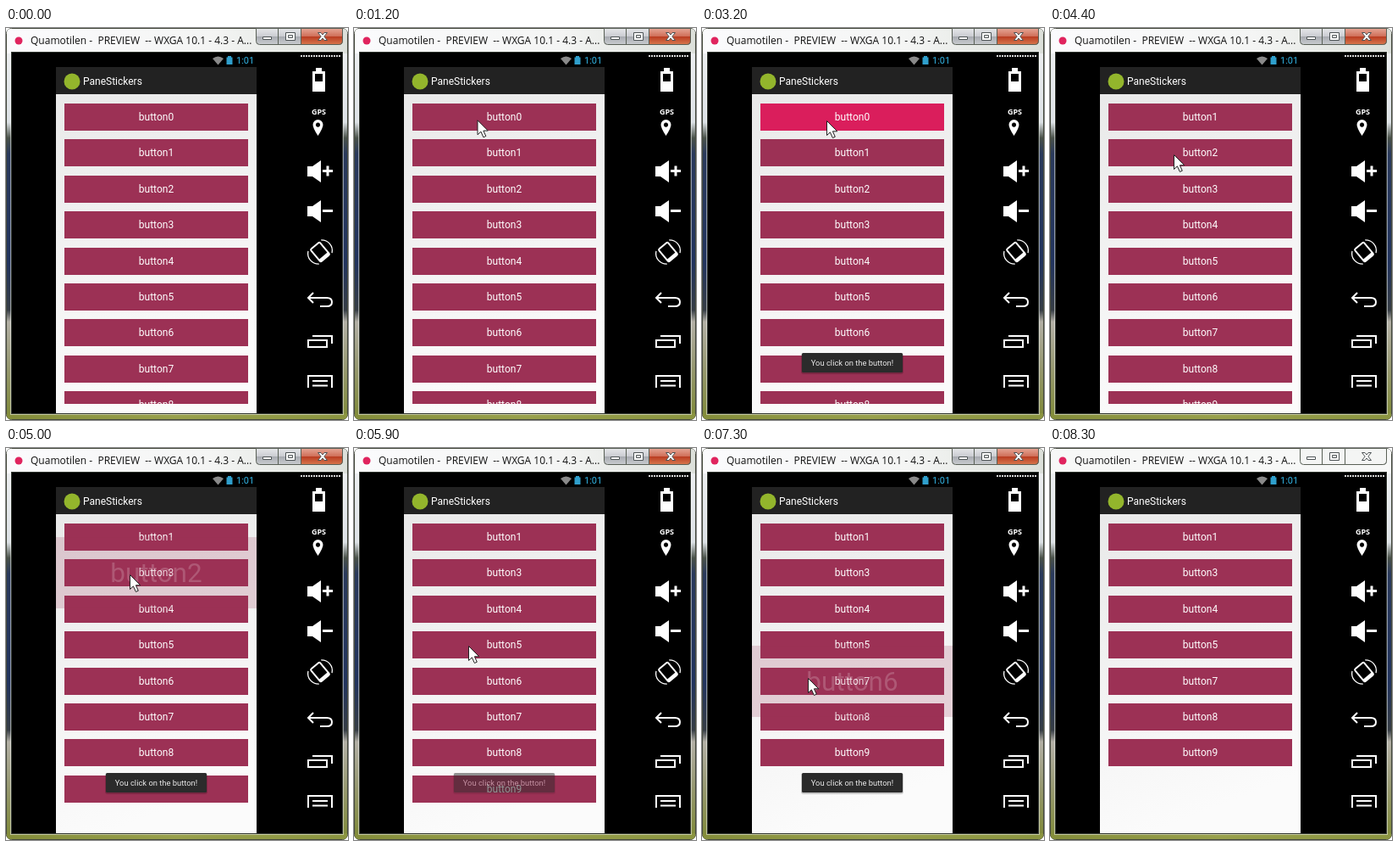
Recreate the animation shown at these times as an HTML page. Size 404 px wide and 462 px high, loop 8400 ms.

```html
<!DOCTYPE html>
<html lang="en">
<head>
<meta charset="utf-8">
<title>Button list</title>
<style>
  html, body { margin: 0; width: 100%; height: 100%; overflow: hidden; background: #fff; }
  svg { display: block; }
  text { font: 12px Roboto, sans-serif; fill: #fff; white-space: pre; }
  .label { text-anchor: middle; }
</style>
</head>
<body>
<svg width="404" height="462" viewBox="0 0 404 462">
  <defs>
    <linearGradient id="glass">
      <stop stop-color="#fbfbfd"/><stop offset=".6" stop-color="#f4f5f4"/>
      <stop offset="1" stop-color="#dce0da"/>
    </linearGradient>
    <linearGradient id="side" x2="0" y2="1">
      <stop stop-color="#f2f3f4"/><stop offset=".24" stop-color="#dde2e6"/>
      <stop offset=".28" stop-color="#4a524a"/><stop offset=".32" stop-color="#2a3a5c"/>
      <stop offset=".6" stop-color="#22345e"/><stop offset=".72" stop-color="#363d45"/>
      <stop offset=".75" stop-color="#b3b0a6"/><stop offset=".87" stop-color="#96986f"/>
      <stop offset="1" stop-color="#7f8a36"/>
    </linearGradient>
    <linearGradient id="base">
      <stop stop-color="#848d3a"/><stop offset=".5" stop-color="#98a04c"/><stop offset="1" stop-color="#8b9540"/>
    </linearGradient>
    <linearGradient id="paper" x2=".25" y2="1">
      <stop stop-color="#e9e9e9"/><stop offset="1" stop-color="#fbfbfb"/>
    </linearGradient>
    <linearGradient id="caption" x2="0" y2="1">
      <stop stop-color="#e6e7ea"/><stop offset=".48" stop-color="#cbcdd2"/>
      <stop offset=".5" stop-color="#a7aab0"/><stop offset="1" stop-color="#c9ccd0"/>
    </linearGradient>
    <linearGradient id="red" x2="0" y2="1">
      <stop stop-color="#e6a696"/><stop offset=".48" stop-color="#d0705a"/>
      <stop offset=".5" stop-color="#b93a20"/><stop offset="1" stop-color="#d8784e"/>
    </linearGradient>
    <clipPath id="screen"><path d="M59 31h237v423H59z"/></clipPath>
    <clipPath id="rows"><path d="M59 78h237v365H59z"/></clipPath>
  </defs>

  <!-- window frame -->
  <rect x=".5" y=".5" width="403" height="461" rx="6" fill="url(#side)" stroke="#44493c"/>
  <path id="bar" d="M1 30V6q0-5 5-5h392q5 0 5 5v24z" fill="url(#glass)"/>
  <path d="M1 454h402v2q0 5-5 5H6q-5 0-5-5z" fill="url(#base)"/>
  <rect x="5.5" y="27.5" width="393" height="428" fill="none" stroke="#fff" opacity=".5"/>
  <rect x="6.5" y="28.5" width="391" height="426" stroke="#30352e"/>
  <circle cx="15" cy="15" r="4.5" fill="#e0245e"/>
  <text x="29" y="19" style="font:12px 'Open Sans',sans-serif;fill:#111">Quamotilen -  PREVIEW  -- WXGA 10.1 - 4.3 - A...</text>
  <g stroke="#596056">
    <path id="captions" d="M295.5 .5h102v15q0 4-4 4h-94q-4 0-4-4z" fill="url(#caption)"/>
    <path id="close" d="M348.5 .5h49v15q0 4-4 4h-45z" fill="url(#red)"/>
    <path d="M321.5 1v18M348.5 1v18" fill="none"/>
    <g fill="#fff" stroke="#4d5355">
      <path d="M303.5 10.5h10v3h-10zM330.5 5.5h11v9h-11zM333.5 8.5h5v3h-5z"/>
      <path d="M368.5 5.5h3.5l2 2.500 2-2.500h3.500l-3.700 4.500 3.700 4.500h-3.500l-2-2.500-2 2.500h-3.500l3.700-4.500z"/>
    </g>
  </g>

  <!-- side tools -->
  <path d="M348 33h48" stroke="#ddd" stroke-width="2" stroke-dasharray="2 1"/>
  <g fill="#fff">
    <path fill-rule="evenodd" d="M362 51h4v-4h7v4h4v24h-15zM365 54v9h9v-9z"/>
    <text x="369.5" y="102" class="label" style="font:bold 9px 'Open Sans',sans-serif">GPS</text>
    <path fill-rule="evenodd" d="M368.5 127q-6-9-6-13a6 6 0 0 1 12 0q0 4-6 13zm0-15.500a2.600 2.600 0 1 0 .01 0z"/>
    <path id="speaker" d="M356 163h6l10-7v26l-10-7h-6z"/>
    <use href="#speaker" y="47"/>
    <path d="M374 167h4.500v-4.500h3V167h4.500v3h-4.500v4.500h-3V170H374zM374 214h12v3h-12z"/>
  </g>
  <g fill="none" stroke="#fff" stroke-width="2">
    <g transform="rotate(-40 371 264)">
      <rect x="364" y="254.500" width="14" height="19" rx="1.500"/>
      <path d="M364 271.500h14" stroke-width="3"/>
      <path d="M361 254q-5 4-5 10t5 10M381 254q5 4 5 10t-5 10" stroke-width="1.300"/>
    </g>
    <path d="M363 312l-6 6 6 6M357 318h22q6 0 6 5t-6 5h-8"/>
    <path d="M357 368h22v8h-22zM362 363h23v9"/>
    <path d="M357 424v-14h28v14M362 416h18M362 421.500h18"/>
  </g>

  <!-- phone screen -->
  <g clip-path="url(#screen)">
    <path d="M244 36q6.500-5 13 0l-6.500 7.500z" fill="#8a8a8a"/>
    <path d="M262 33h4v1.500h1.500V43h-7v-8.500h1.500z" fill="#2f9fcc"/>
    <text x="272" y="42" style="font-size:11px;fill:#33b5e5">1:01</text>
    <path d="M59 46h237v32H59z" fill="#222"/>
    <circle cx="78" cy="63" r="9.500" fill="#93b52c"/>
    <text x="91" y="67">PaneStickers</text>
    <path d="M59 78h237v376H59z" fill="url(#paper)"/>
    <g id="list" clip-path="url(#rows)"></g>
    <g id="ghost"></g>
    <g id="toast">
      <rect x="117" y="383" width="121" height="25" rx="3" opacity=".2"/>
      <rect x="118" y="383" width="119" height="23" rx="1.500" fill="#2b2b2b"/>
      <text x="177.5" y="398" class="label" style="font-size:9.400px;fill:#e8e8e8">You click on the button!</text>
    </g>
  </g>
  <path id="cursor" d="M.5 .5v17l3.900-3.600 3 6.600 2.900-1.300-2.900-6.400h5.400z" fill="#fff" stroke="#222"/>
</svg>
<script>
const LOOP = 8400, STEP = 100, PITCH = 42.4, GROW = 700;
const NORMAL = '#9c3155', PRESSED = '#da1e5c';
const $ = id => document.getElementById(id);

// Each removal: which button, the row it sits in, when it is pressed and released.
const removals = [
  { button: 0, row: 0, press: 3200, release: 3300 },
  { button: 2, row: 1, press: 4420, release: 4500 },
  { button: 6, row: 4, press: 6700, release: 6800 },
];
const firstClick = [1300, 1500];
const toasts = [[1500, 3500], [4500, 5750], [6800, 7800]]; // fade-in start, fade-out start
const path = [ // time, x, y
  [600, 205, 464], [900, 150, 112], [1300, 144, 107], [2100, 144, 107], [2900, 147, 109],
  [4000, 147, 109], [4400, 146, 149], [5200, 146, 149], [5600, 140, 192], [5900, 135, 233],
  [6400, 125, 271], [7600, 125, 271], [8100, 205, 464],
];

const clamp = v => Math.max(0, Math.min(1, v));
const ease = p => (1 - Math.cos(Math.PI * p)) / 2;

function makeButton(i, parent) {
  const g = document.createElementNS('http://www.w3.org/2000/svg', 'g');
  g.innerHTML = `<rect x="-108.5" y="-16" width="217" height="32" fill="${NORMAL}"/>
    <text y="4.3" class="label">button${i}</text>`;
  return parent.appendChild(g);
}

const buttons = Array.from({ length: 10 }, (_, i) => makeButton(i, $('list')));
const ghosts = removals.map(r => makeButton(r.button, $('ghost')));
const place = (g, row, scale = 1) =>
  g.setAttribute('transform', `translate(177.5 ${Math.round(105 + row * PITCH)}) scale(${scale})`);

function cursorAt(t) {
  const k = path.findIndex(p => p[0] > t);
  if (k < 1) return [-50, -50];
  const [t0, x0, y0] = path[k - 1], [t1, x1, y1] = path[k];
  const p = (t - t0) / (t1 - t0);
  return [x0 + (x1 - x0) * p, y0 + (y1 - y0) * p];
}

function draw(t) {
  let row = 0;
  buttons.forEach((g, i) => {
    const r = removals.find(r => r.button === i);
    const gone = r && t >= r.release;
    const down = r && t >= r.press || i === 0 && t >= firstClick[0] && t < firstClick[1];
    g.style.display = gone ? 'none' : '';
    g.firstChild.setAttribute('fill', down ? PRESSED : NORMAL);
    if (!gone) place(g, row++);
  });

  removals.forEach((r, k) => {
    const p = (t - r.release) / GROW, e = ease(clamp(p));
    ghosts[k].style.display = p >= 0 && p < 1 ? '' : 'none';
    ghosts[k].setAttribute('opacity', 1 - e);
    place(ghosts[k], r.row, 1 + 2 * e);
  });

  const shown = toasts.map(([on, off]) => Math.min(clamp((t - on) / 250), clamp(1 - (t - off) / 300)));
  $('toast').setAttribute('opacity', Math.max(...shown));
  $('cursor').setAttribute('transform', `translate(${cursorAt(t)})`);

  const inactive = t >= 8100;
  $('bar').setAttribute('fill', inactive ? '#f7f8f7' : 'url(#glass)');
  $('close').setAttribute('fill', inactive ? '#f4f5f4' : 'url(#red)');
  $('captions').setAttribute('fill', inactive ? '#f4f5f4' : 'url(#caption)');
}

function tick() {
  draw(Math.floor(performance.now() % LOOP / STEP) * STEP);
  requestAnimationFrame(tick);
}
tick();
</script>
</body>
</html>
```
